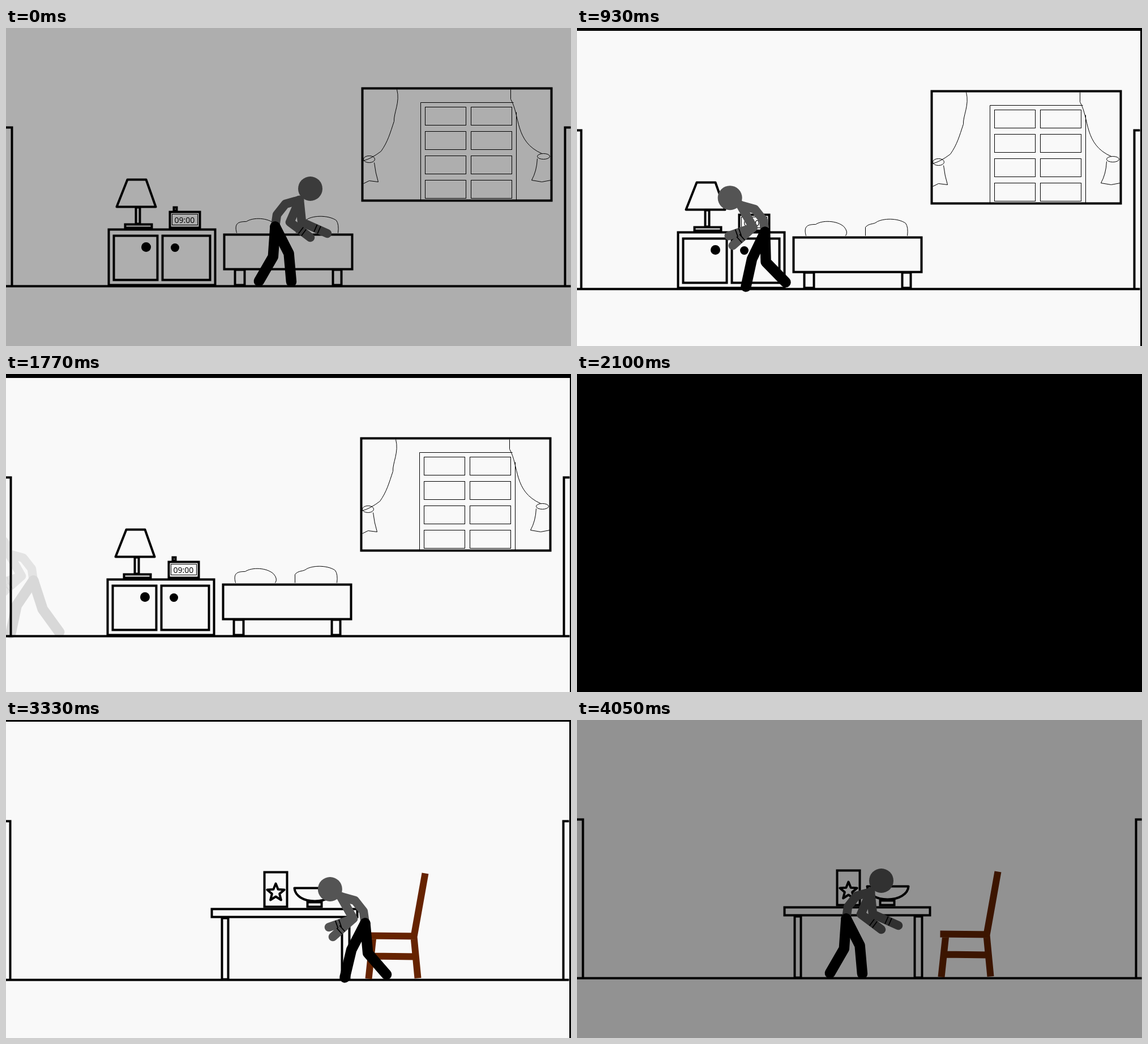
Recreate the animation shown at these times as an HTML page. Size 998x561 px, loop 4.5 s.

```html
<!DOCTYPE html>
<html lang="en">
<head>
<meta charset="utf-8">
<title>Morning walk</title>
<style>
  html, body { margin: 0; width: 100%; height: 100%; overflow: hidden; background: #000; }
  svg { display: block; width: 100vw; height: 100vh; }
  .bold { fill: none; stroke: #000; stroke-width: 4; }
  .thin { fill: none; stroke: #000; stroke-width: 1; }
  .wood { fill: none; stroke: #662300; stroke-width: 12; }
  .limb { fill: none; stroke-linecap: round; stroke-linejoin: round; }
  .skin { stroke: #545454; stroke-width: 15.5; }
  .leg { stroke: #000; stroke-width: 18.5; }
  .band { fill: none; stroke: #000; stroke-width: 1.8; }
  text { font: 14px "Open Sans", "Noto Sans", sans-serif; }
</style>
</head>
<body>
<svg viewBox="0 0 998 561">
  <rect width="998" height="561"/>
  <g id="camera">
    <rect width="998" height="561" fill="#f9f9f9"/>
    <!-- half a pixel puts hairlines on pixel centres -->
    <g transform="translate(.5 .5)">
      <path class="bold" d="M-1 455H997M-1 175H10V455M997 175H987V455"/>
      <g id="bedroom">
        <g class="bold">
          <rect x="629" y="106" width="334" height="198"/>
          <path d="M214 267H247L264 315H195Z" stroke-linejoin="round"/>
          <path d="M229 316H236V345H229ZM210 346H257V352H210Z"/>
          <path d="M289 324H342V352H289ZM296 316H301V322H296Z"/>
          <path d="M181 355H369V453H181ZM190 366H267V444H190ZM276 366H360V444H276Z"/>
          <path d="M385 364H611V425H385ZM404 426H421V453H404ZM577 426H592V453H577Z"/>
        </g>
        <circle cx="247" cy="386" r="8.500"/>
        <circle cx="298" cy="387" r="7.500"/>
        <text x="297" y="343">09:00</text>
        <g class="thin">
          <rect x="293" y="328" width="45" height="19"/>
          <path d="M732 303V131H896M901 148V303"/>
          <g id="panes"></g>
          <path d="M690 108C696 130 684 150 685 164C678 185 674 200 662 217Q645 230 630 234"/>
          <path d="M650 237Q652 255 657 271L641 269 631 274"/>
          <ellipse cx="641" cy="231" rx="10" ry="6"/>
          <path d="M891 108V125C908 155 898 200 946 221"/>
          <path d="M938 230Q937 252 928 268L946 271 962 268"/>
          <ellipse cx="949" cy="226" rx="11" ry="5"/>
          <path d="M407 361C402 343 411 341 424 341C436 333 462 334 474 345Q482 354 477 361"/>
          <path d="M512 361V346C519 338 526 342 533 336C548 329 572 331 583 339Q588 346 586 361"/>
        </g>
      </g>
      <g id="kitchen">
        <g class="bold">
          <path d="M366 330H623V344H366ZM384 346H395V454H384ZM596 346H609V454H596Z"/>
          <rect x="459" y="265" width="40" height="61"/>
          <path d="M512 293H585C584 307 568 316 548 316S513 307 512 293Z" stroke-linejoin="round"/>
          <rect x="535" y="318" width="25" height="8"/>
          <polygon id="star" stroke-linejoin="round"/>
        </g>
        <path class="wood" d="M743 267L723 379 730 452M651 378L643 453M641 377L729 378M650 413L725 414"/>
      </g>
      <g id="figure">
        <g class="limb skin">
          <path id="spine"/><path id="farArm"/><path id="nearArm"/>
        </g>
        <circle id="head" r="21.500" fill="#545454"/>
        <path id="bands" class="band"/>
        <g class="limb leg"><path id="legA"/><path id="legB"/></g>
      </g>
    </g>
  </g>
  <rect id="shade" width="998" height="561"/>
</svg>
<script>
const $ = id => document.getElementById(id);
const LOOP = 4500, STEP = 30, TURN_X = 475;
const THIGH = 53, SHIN = 50;

for (let i = 0; i < 8; i++) {
  const x = 740 + 81 * (i % 2), y = 139 + 43 * (i >> 1);
  $("panes").innerHTML += `<rect x="${x}" y="${y}" width="72" height="32"/>`;
}

$("star").setAttribute("points", Array.from({ length: 10 }, (_, i) => {
  const r = i % 2 ? 7 : 16, a = i * Math.PI / 5;
  return [479 + r * Math.sin(a), 301 - r * Math.cos(a)];
}).join(" "));

const clamp = v => Math.max(0, Math.min(1, v));
const ramp = (t, from, to) => clamp((t - from) / (to - from));
const ease = k => k * k * (3 - 2 * k);
const lerp = (a, b, k) => a + (b - a) * k;
const line = pts => "M" + pts.map(p => p.join(" ")).join("L");

// The camera drifts from rest through two soft key positions and back.
function drift(t, keys) {
  return [1, 2].map(axis => keys.slice(1).reduce((v, key, i) =>
    v + (key[axis] - keys[i][axis]) * ease(ramp(t, keys[i][0], key[0])), 0));
}

const SCENES = {
  bedroom: {
    camera: [[270, 0, 0], [930, -3, 5], [1770, -2, 7], [2100, 0, 0]],
    shade: t => .3 * (1 - ramp(t, 270, 360)) + ramp(t, 1800, 2100),
    alpha: t => 1 - ramp(t, 1560, 1800),
    hipX: t => TURN_X - .339 * Math.max(0, t - 516),
    step: t => (t - 1770) / 300,
    walking: t => ramp(t, 270, 510)
  },
  kitchen: {
    camera: [[2220, 0, 0], [2520, -5, -9], [3330, -3, 3], [4050, 0, 0]],
    shade: t => 1 - ramp(t, 2220, 2490) + .414 * ramp(t, 3930, 4050),
    alpha: t => ramp(t, 2280, 2550),
    hipX: t => TURN_X + .327 * Math.max(0, 3825 - t),
    step: t => (t - 3280) / 300,
    walking: t => 1 - ramp(t, 3825, 4050)
  }
};

// Swing of the leg bones in degrees from straight down, forward positive.
const thighSwing = a =>
  14 + 26 * Math.cos(a) - 12.5 * Math.sin(a) - 6 * Math.cos(2 * a);
const shinSwing = a =>
  -26 + 24 * Math.cos(a) + 24 * Math.sin(a) + 14 * Math.cos(2 * a)
  + 6 * Math.sin(2 * a) - 5.5 * Math.sin(3 * a);

function bone([x, y], degrees, length) {
  const a = degrees * Math.PI / 180;
  return [x - length * Math.sin(a), y + length * Math.cos(a)];
}

function leg(hip, phase, restThigh, restShin, walking) {
  const knee = bone(hip, lerp(restThigh, thighSwing(phase), walking), THIGH);
  return [hip, knee, bone(knee, lerp(restShin, shinSwing(phase), walking), SHIN)];
}

function stripes([, [ex, ey], [hx, hy]]) {
  const len = Math.hypot(hx - ex, hy - ey), nx = 7 * (ey - hy) / len, ny = 7 * (hx - ex) / len;
  return [.54, .68].map(k => {
    const x = lerp(ex, hx, k), y = lerp(ey, hy, k);
    return line([[x - nx, y - ny], [x + nx, y + ny]]);
  }).join("");
}

function drawFigure(x, step, walking) {
  const phase = Math.PI * step, rest = 1 - walking;
  const y = lerp(350, 349 + 8 * Math.cos(phase) ** 2, walking);
  const facing = rest - walking, hip = [x, y];
  const at = (dx, dy) => [x + dx * facing, y + dy];
  const neck = at(43, -47), head = at(62, -60 - 7 * rest);
  const near = [neck, at(21 + 5 * rest, -8), at(57 + 5 * rest, 24 - 5 * rest)];
  const far = [neck, at(21 + 26 * rest, -8), at(64 + 28 * rest, 7 + 5 * rest)];
  const parts = {
    spine: [hip, at(3, -21), at(18, -40), neck], nearArm: near, farArm: far,
    legA: leg(hip, phase, 4, 30, walking),
    legB: leg(hip, phase + Math.PI, -27, -5, walking)
  };
  for (const id in parts) $(id).setAttribute("d", line(parts[id]));
  $("head").setAttribute("cx", head[0]);
  $("head").setAttribute("cy", head[1]);
  $("bands").setAttribute("d", stripes(far) + stripes(near));
}

function render(ms) {
  const t = Math.max(270, Math.min(4050, Math.floor((ms % LOOP) / STEP) * STEP));
  const name = t < 2250 ? "bedroom" : "kitchen", scene = SCENES[name];
  for (const id in SCENES) $(id).style.display = id === name ? "" : "none";
  const [dx, dy] = drift(t, scene.camera).map(Math.round);
  $("camera").setAttribute("transform", `translate(${dx} ${dy})`);
  $("shade").setAttribute("opacity", scene.shade(t));
  $("figure").setAttribute("opacity", scene.alpha(t));
  drawFigure(scene.hipX(t), scene.step(t), ease(scene.walking(t)));
}

const start = performance.now();
function tick() {
  render(performance.now() - start);
  requestAnimationFrame(tick);
}
tick();
</script>
</body>
</html>
```
